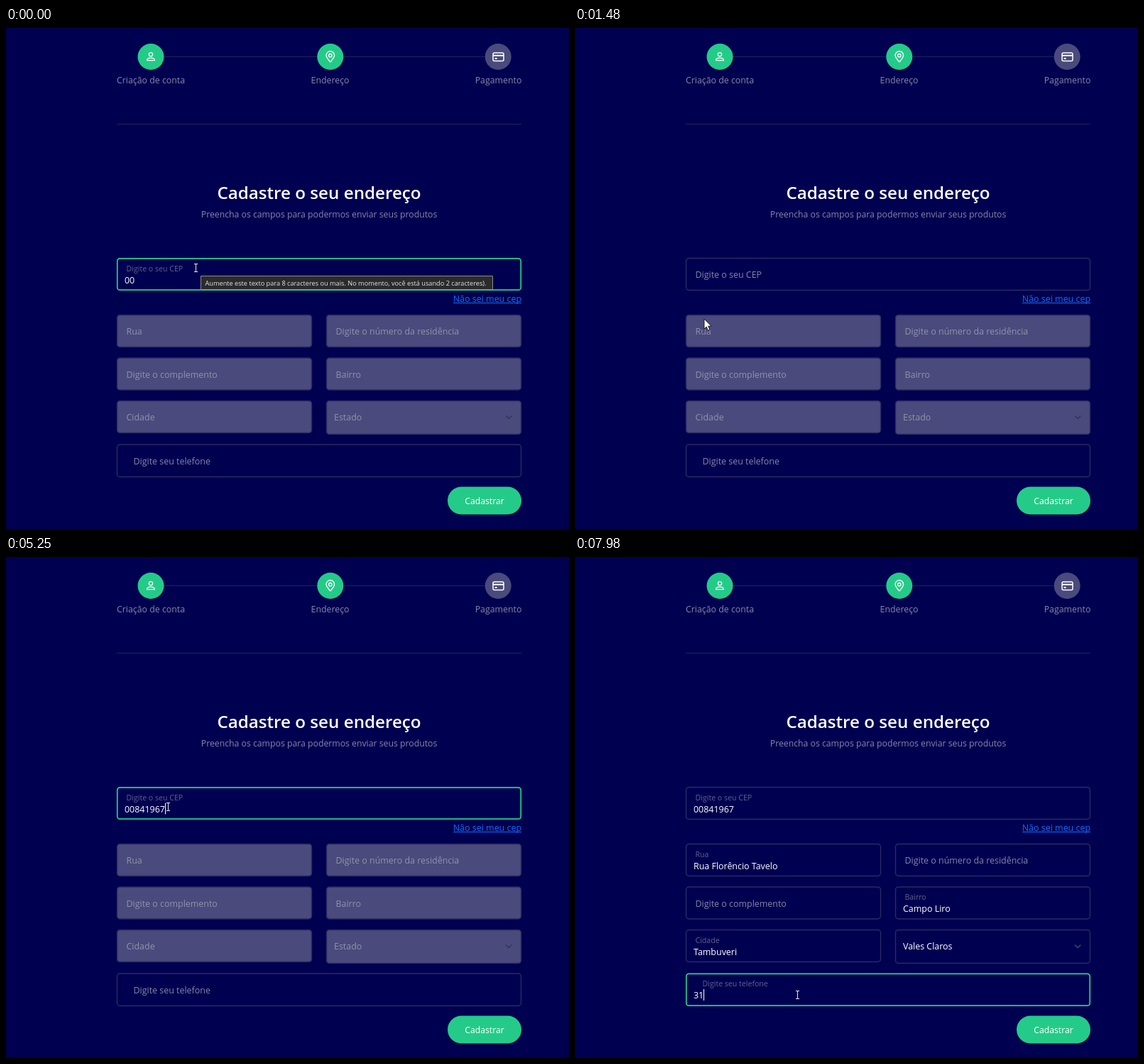
These frames come from a looping animation (793 by 706 pixels, 8 s). An HTML page with a canvas:

```html
<!DOCTYPE html>
<html lang="pt-BR">
<head>
<meta charset="utf-8">
<title>Cadastro de endereço</title>
<style>
  html, body { margin: 0; width: 100%; height: 100%; overflow: hidden; background: #000050; }
  canvas { display: block; }
</style>
</head>
<body>
<canvas id="stage" width="793" height="706"></canvas>
<script>
const ctx = document.getElementById('stage').getContext('2d');
const LOOP = 8000;
const FONT = '"Open Sans", "Noto Sans", sans-serif';
const C = {
  bg: '#000050', green: '#24cb88', grey: '#4a4a7c', line: '#22225a',
  border: '#2b2b60', muted: '#8686a6', floated: '#62628c', white: '#fff', link: '#0d6efd'
};

// Moments of the story, in ms
const LOADING = [1160, 1420], FOCUS = 1930, FILLED = 5370, PHONE = 7290;
const FIRST = { text: '00697314', keys: [-600, -600, 240, 360, 510, 860, 980, 1130] };
const SECOND = { text: '00841967', keys: [2570, 2960, 3680, 3800, 3950, 4660, 4810, 5250] };
const DIAL = { text: '31', keys: [7730, 7860] };

const RECENT = ['00697314', '00417386', '00417382', '00528140', '00417383', '00963072'];
const MATCHES = ['00417386', '00417382', '00417383', '00417594', '00528140', '00963072'];
const PHONES = ['00955500142', '00955500178', '00955500119', '00955500163'];

const MOUSE = [
  [0, 267, 338], [1260, 266, 338], [1480, 182, 410], [1640, 180, 414], [1930, 228, 352],
  [6100, 228, 352], [6480, 375, 557], [6640, 381, 556], [6900, 318, 556], [6990, 313, 617]
];

const clamp = v => Math.max(0, Math.min(1, v));
const ramp = (t, start, length) => clamp((t - start) / length);
const mix = (a, b, k) => a + (b - a) * k;

function text(str, x, y, { size = 12.45, color = C.muted, weight = 400, align = 'left', alpha = 1 } = {}) {
  ctx.save();
  ctx.globalAlpha *= alpha;
  ctx.font = `${weight} ${size}px ${FONT}`;
  ctx.fillStyle = color;
  ctx.textAlign = align;
  ctx.fillText(str, x, y);
  ctx.restore();
}

function box(x, y, w, h, r, { fill, stroke, width = 1, alpha = 1 }) {
  ctx.save();
  ctx.globalAlpha *= alpha;
  ctx.beginPath();
  ctx.roundRect(x, y, w, h, r);
  if (fill) { ctx.fillStyle = fill; ctx.fill(); }
  if (stroke) { ctx.strokeStyle = stroke; ctx.lineWidth = width; ctx.stroke(); }
  ctx.restore();
}

function stroke(color, width, draw) {
  ctx.beginPath();
  draw();
  ctx.strokeStyle = color;
  ctx.lineWidth = width;
  ctx.stroke();
}

function segment(x1, y1, x2, y2, color = C.line, width = 1) {
  stroke(color, width, () => { ctx.moveTo(x1, y1); ctx.lineTo(x2, y2); });
}

function disc(x, y, r, color) {
  ctx.beginPath();
  ctx.arc(x, y, r, 0, 7);
  ctx.fillStyle = color;
  ctx.fill();
}

function steps() {
  segment(222, 40.5, 439, 40.5);
  segment(475, 40.5, 675, 40.5);
  disc(204, 40.5, 18.5, C.green);
  disc(456.8, 40.5, 18.5, C.green);
  disc(693.2, 40.5, 18.5, C.grey);

  stroke(C.white, 1.3, () => ctx.arc(204, 37.2, 2.6, 0, 7));
  stroke(C.white, 1.3, () => {
    ctx.moveTo(198.6, 45.6);
    ctx.bezierCurveTo(198.6, 40.9, 209.4, 40.9, 209.4, 45.6);
    ctx.closePath();
  });

  stroke(C.white, 1.4, () => {
    ctx.moveTo(456.8, 48);
    ctx.bezierCurveTo(453.5, 44, 451, 41.5, 451, 38.6);
    ctx.arc(456.8, 38.6, 5.8, Math.PI, 0);
    ctx.bezierCurveTo(462.6, 41.5, 460, 44, 456.8, 48);
  });
  stroke(C.white, 1.3, () => ctx.arc(456.8, 38.7, 2.2, 0, 7));

  box(686, 35, 15, 11.5, 2, { stroke: C.white, width: 1.5 });
  segment(686, 38.8, 701, 38.8, C.white, 2);
  segment(688.5, 43, 691.5, 43, C.white, 2);

  text('Criação de conta', 204, 78.3, { size: 12.35, align: 'center' });
  text('Endereço', 456.5, 78.3, { size: 12.35, align: 'center' });
  text('Pagamento', 693.5, 78.3, { size: 12.35, align: 'center' });
  segment(156, 135.5, 726, 135.5);
}

// Form control with a floating label; off, focus and float run from 0 to 1
function field({ x, y, w, h = 46, label, inset = 13.5, value = '', off = 0, focus = 0, float = 0 }) {
  box(x + .5, y + .5, w - 1, h - 1, 4, { fill: C.grey, alpha: off });
  box(x + .5, y + .5, w - 1, h - 1, 4, { stroke: C.border, width: 1.4 });
  if (focus) box(x + .8, y + .8, w - 1.6, h - 1.6, 3.5, { stroke: C.green, width: 1.7, alpha: focus });
  text(label, x + inset, y + mix(28, 18.5, float), {
    size: mix(12.45, 10.6, float), color: float > .5 ? C.floated : off > .5 ? '#9292ac' : C.muted
  });
  if (value) text(value, x + 11, y + 35.5, { color: C.white });
}

function typed({ text: str, keys }, t) {
  return str.slice(0, keys.filter(k => t >= k).length);
}

function caret(str, y, t, since) {
  const last = Math.max(...since.filter(k => k <= t));
  if ((t - last) % 1020 >= 510) return;
  ctx.font = `12.45px ${FONT}`;
  const x = Math.round(167 + ctx.measureText(str).width) + .5;
  segment(x, y, x, y + 16, C.white);
}

function suggestions(y, items, alpha) {
  if (alpha <= 0) return;
  ctx.save();
  ctx.globalAlpha = alpha;
  const h = 12.4 + items.length * 29.4;
  box(156, y + 2, 158, h + 1, 2, { fill: 'rgba(0,0,0,.3)' });
  box(156, y, 156, h, 1, { fill: '#2a2b2e' });
  items.forEach((s, i) => text(s, 164, y + 24.6 + i * 29.4, { size: 9.85, weight: 600, color: '#f2f2f2' }));
  ctx.restore();
}

function form(t) {
  text('Cadastre o seu endereço', 441, 240.5, { size: 24.2, weight: 600, color: C.white, align: 'center' });
  text('Preencha os campos para podermos enviar seus produtos', 441, 266.5, { size: 12.25, align: 'center' });

  const filled = ramp(t, FILLED, 140);
  const off = 1 - filled;
  const done = t >= FILLED;
  const again = t >= FOCUS;
  const cep = again ? typed(SECOND, t) : t < LOADING[1] ? typed(FIRST, t) : '';
  const float = again ? ramp(t, FOCUS, 90) : 1 - ramp(t, LOADING[1], 60);

  field({ x: 156, y: 324, w: 570, label: 'Digite o seu CEP', value: cep, float, focus: float * off });
  if (again && !done) caret(cep, 346.5, t, [FOCUS, ...SECOND.keys]);
  if (!again && t < LOADING[0]) caret(cep, 346.5, t, FIRST.keys);

  text('Não sei meu cep', 726, 385.5, { color: C.link, align: 'right' });
  segment(630, 387.5, 726, 387.5, C.link);

  const left = { x: 156, w: 275, off }, right = { x: 451, w: 275, off };
  const auto = value => ({ value: done ? value : '', float: filled });
  field({ ...left, y: 404, label: 'Rua', ...auto('Rua Florêncio Tavelo') });
  field({ ...right, y: 404, label: 'Digite o número da residência' });
  field({ ...left, y: 464.5, label: 'Digite o complemento' });
  field({ ...right, y: 464.5, label: 'Bairro', ...auto('Campo Liro') });
  field({ ...left, y: 525, label: 'Cidade', ...auto('Tambuveri') });
  field({ ...right, y: 525, h: 48, label: '' });
  text(done ? 'Vales Claros' : 'Estado', 462, 553.3, { color: done ? C.white : '#9292ac' });
  stroke(done ? '#48486a' : '#34344f', 1.4, () => {
    ctx.moveTo(704, 546.5); ctx.lineTo(708.2, 550.5); ctx.lineTo(712.4, 546.5);
  });

  const call = ramp(t, PHONE, 110), dial = typed(DIAL, t);
  field({ x: 156, y: 586.5, w: 570, h: 46.5, inset: 23.5, label: 'Digite seu telefone', value: dial, focus: call, float: call });
  if (t >= PHONE) caret(dial, 609, t, [PHONE, ...DIAL.keys]);

  box(622, 646.5, 104, 39, 19.5, { fill: C.green });
  text('Cadastrar', 674, 670.8, { size: 12.2, color: C.white, align: 'center' });

  const list = cep === '' ? RECENT : cep.length < 2 ? MATCHES : MATCHES.slice(0, 4);
  suggestions(373, list, ramp(t, FOCUS + 20, 60) * (1 - ramp(t, 3680, 230)));
  suggestions(455, PHONES, ramp(t, PHONE + 20, 60) * (1 - ramp(t, 7730, 220)));
}

function tooltip() {
  box(274.5, 349.5, 411, 19, 0, { fill: '#2b2b2b', stroke: '#8c8c8c' });
  text('Aumente este texto para 8 caracteres ou mais. No momento, você está usando 2 caracteres).',
    280.5, 362.7, { size: 9.2, color: '#e4e4e4' });
}

function loader(t) {
  ctx.fillStyle = 'rgba(0,0,0,.5)';
  ctx.fillRect(0, 0, 793, 706);
  const turn = (t - 1195) / 750 * Math.PI * 2;
  stroke('#0dc5f2', 3, () => ctx.arc(441, 367, 23, turn + .85, turn + 5.43));
}

function mouseAt(t) {
  const i = MOUSE.findIndex(p => p[0] > t);
  if (i < 0) return MOUSE[MOUSE.length - 1].slice(1);
  const [t0, x0, y0] = MOUSE[i - 1], [t1, x1, y1] = MOUSE[i];
  const k = (t - t0) / (t1 - t0), e = k * k * (3 - 2 * k);
  return [mix(x0, x1, e), mix(y0, y1, e)];
}

function pointer(t, loading) {
  const [x, y] = mouseAt(t).map(Math.round);
  const within = (a, b) => y >= a && y <= b;
  const overInput = !loading && (within(324, 370) || t >= FILLED &&
    (within(404, 450) || within(464, 511) || within(525, 571) || within(587, 633)));
  if (overInput) {
    const cx = x + .5;
    segment(cx, y - 5, cx, y + 5, '#e8e8e8');
    for (const s of [-1, 1]) segment(cx - 2.5, y + s * 5.5, cx + 2.5, y + s * 5.5, '#e8e8e8');
    return;
  }
  ctx.beginPath();
  [[0, 0], [0, 14], [3.2, 11], [5.4, 16], [7.8, 15], [5.6, 10.2], [9.8, 10]]
    .forEach(([dx, dy]) => ctx.lineTo(x + dx, y + dy));
  ctx.closePath();
  ctx.fillStyle = C.white;
  ctx.fill();
  ctx.strokeStyle = '#000';
  ctx.lineWidth = .8;
  ctx.stroke();
}

function draw(t) {
  const loading = t >= LOADING[0] && t < LOADING[1];
  ctx.fillStyle = C.bg;
  ctx.fillRect(0, 0, 793, 706);
  steps();
  form(t);
  if (t < 240) tooltip();
  if (loading) loader(t);
  pointer(t, loading);
}

const start = performance.now();
function tick() {
  draw((performance.now() - start) % LOOP);
  requestAnimationFrame(tick);
}
tick();
</script>
</body>
</html>
```
